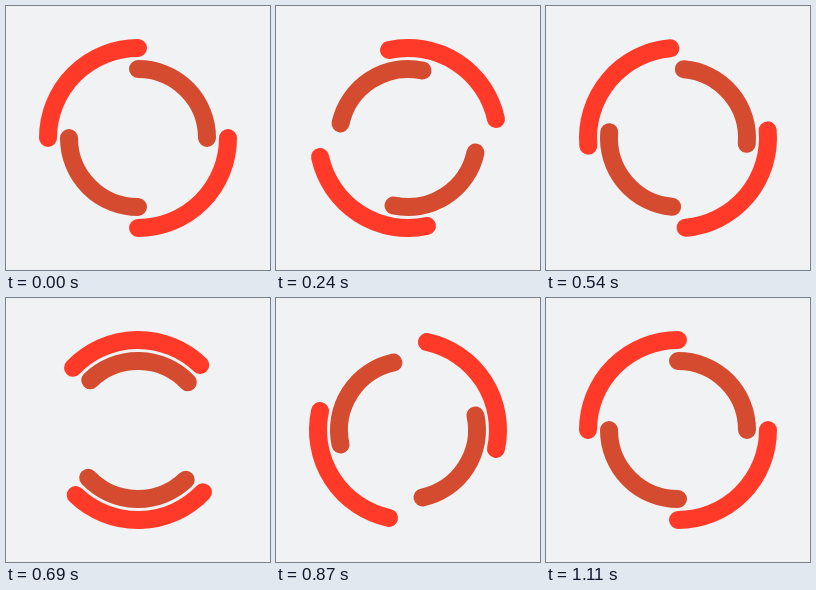
These frames come from a looping animation (264 by 264 pixels, 1140 ms). An HTML page with a canvas:

```html
<!DOCTYPE html>
<html lang="en">
<head>
<meta charset="utf-8">
<title>Double ring spinner</title>
<style>
  html, body { margin: 0; width: 100%; height: 100%; overflow: hidden; background: #f1f2f3; }
  canvas { display: block; width: 264px; height: 264px; }
</style>
</head>
<body>
<canvas id="stage"></canvas>
<script>
const SIZE = 264;
const LOOP = 1140;
const TICK = 30;
const TURN_TICKS = 37; // the last tick of the loop rests on the starting pose

const canvas = document.getElementById('stage');
const ctx = canvas.getContext('2d');
const ratio = window.devicePixelRatio || 1;
canvas.width = canvas.height = SIZE * ratio;
ctx.scale(ratio, ratio);
ctx.lineWidth = 18;
ctx.lineCap = 'round';

// Two opposite quarter arcs
function ring(radius, color, angle) {
  ctx.strokeStyle = color;
  for (const start of [angle, angle + Math.PI]) {
    ctx.beginPath();
    ctx.arc(SIZE / 2, SIZE / 2, radius, start, start + Math.PI / 2);
    ctx.stroke();
  }
}

function draw(time) {
  const tick = Math.floor((time % LOOP) / TICK);
  const turn = tick / TURN_TICKS * 2 * Math.PI;
  ctx.fillStyle = '#f1f2f3';
  ctx.fillRect(0, 0, SIZE, SIZE);
  ring(90, '#ff3a29', turn);
  ring(69, '#d44b30', Math.PI / 2 - turn);
}

let origin;
function loop(now) {
  origin ??= now;
  draw(now - origin);
  requestAnimationFrame(loop);
}
draw(0);
requestAnimationFrame(loop);
</script>
</body>
</html>
```
